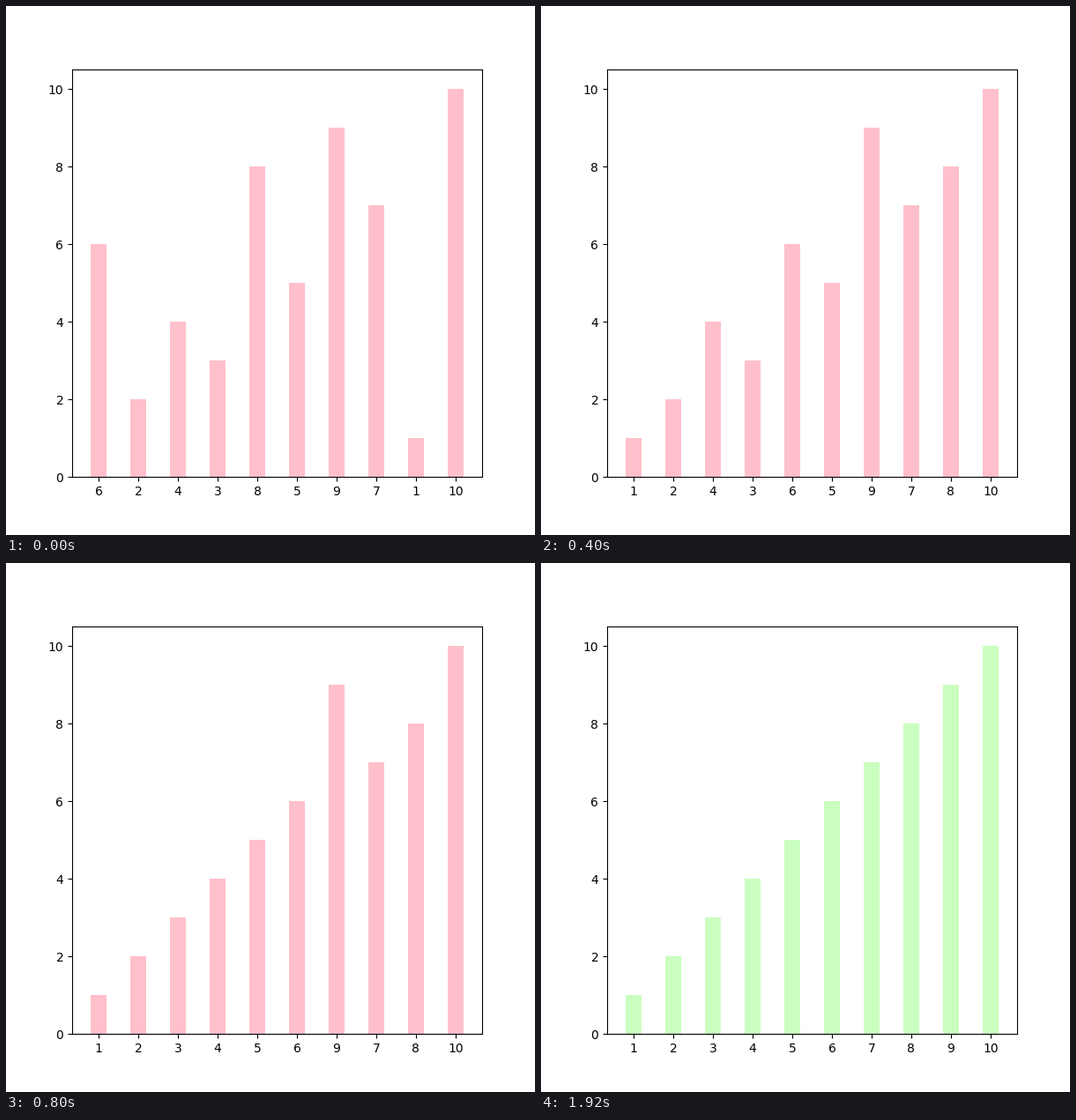
These frames come from a looping animation (600x600 px, 2.4 s). A matplotlib script:

```python
import matplotlib.pyplot as plt
from matplotlib.animation import FuncAnimation

START = [6, 2, 4, 3, 8, 5, 9, 7, 1, 10]
SWAPS = [(4, 8), (0, 4), (2, 3), (4, 5), (6, 7), (7, 8)]
STEP_MS = 200
FRAMES = 12
BUSY, DONE = "pink", "#caffbf"


def order_after(count):
    values = START[:]
    for i, j in SWAPS[:count]:
        values[i], values[j] = values[j], values[i]
    return values


fig, ax = plt.subplots(figsize=(6, 6), dpi=100)
slots = range(len(START))
bars = ax.bar(slots, START, width=0.4, color=BUSY)
ax.set_xticks(slots, [str(v) for v in START])


def draw(frame):
    values = order_after(frame)
    color = DONE if values == sorted(values) else BUSY
    for bar, value in zip(bars, values):
        bar.set_height(value)
        bar.set_color(color)
        bar.set_linewidth(0)
    ax.set_xticklabels([str(v) for v in values])
    return list(bars)


anim = FuncAnimation(fig, draw, frames=FRAMES, interval=STEP_MS,
                     repeat=True, repeat_delay=0, blit=False)
plt.show()
```
